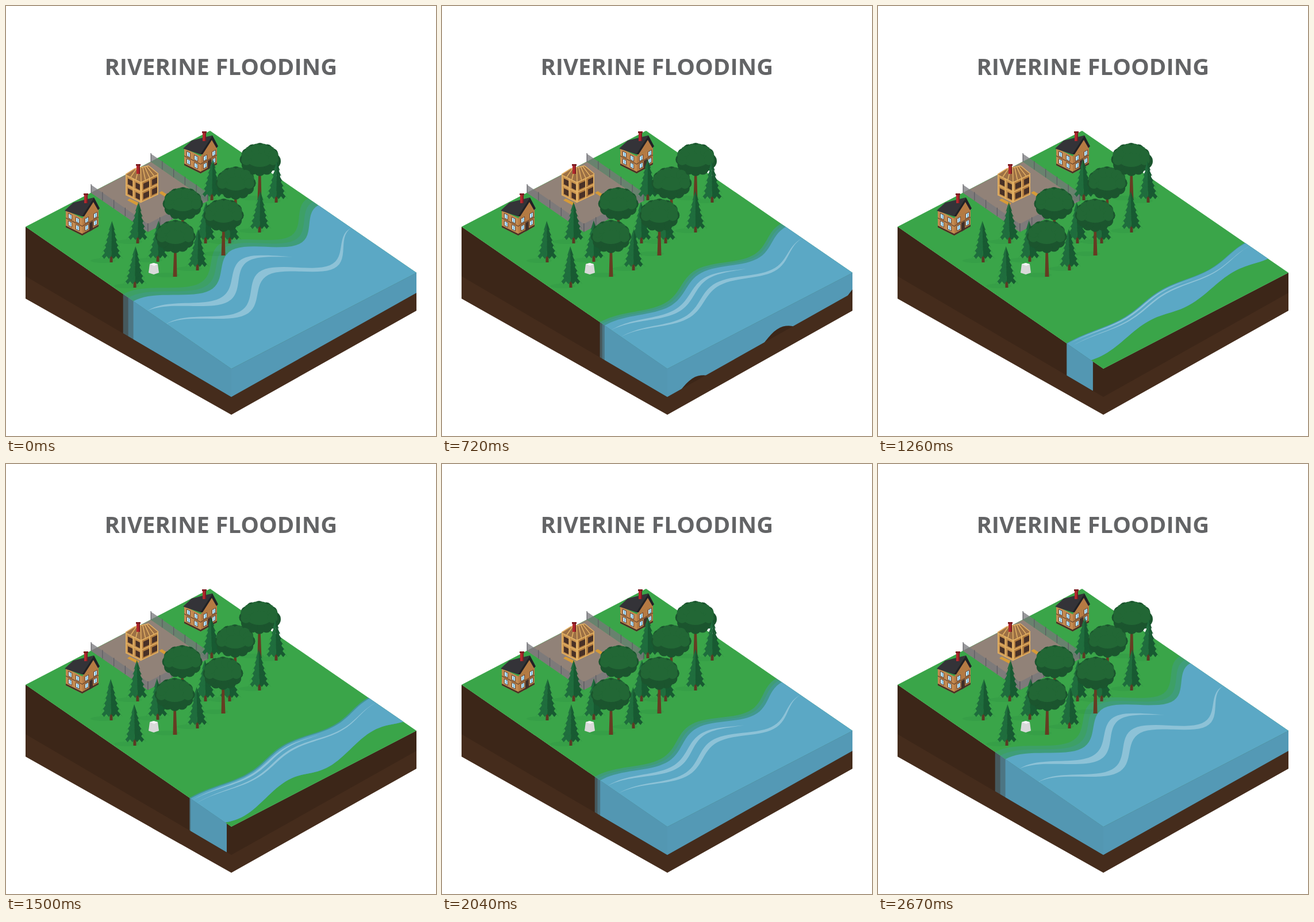
These frames come from a looping animation (748 by 748 pixels, 2700 ms). An HTML page:

```html
<!DOCTYPE html>
<html lang="en">
<head>
<meta charset="utf-8">
<title>Riverine flooding</title>
<style>
html, body { margin: 0; width: 100%; height: 100%; overflow: hidden; background: #fff; }
svg { display: block; width: 748px; height: 748px; }
text { font: bold 40px "Open Sans", sans-serif; fill: #636466; }
</style>
</head>
<body>
<svg viewBox="0 0 748 748">
  <defs>
    <clipPath id="topClip"><path d="M355 217 714 464 392 631 34 384Z"/></clipPath>
    <clipPath id="riverClip"><path id="river"/></clipPath>
  </defs>

  <text x="171.400" y="120">RIVERINE FLOODING</text>

  <path fill="#452c1c" d="M34 384 392 631 714 464V530L392 711 34 509Z"/>
  <path fill="#3c2618" d="M34 384 392 631 714 464V499L392 680 34 470Z"/>
  <path fill="#3aa549" d="M355 217 714 464 392 631 34 384Z"/>

  <g clip-path="url(#topClip)"><g clip-path="url(#riverClip)">
    <path id="top0" fill="#4496a8"/>
    <path id="top1" fill="#4496a8"/>
    <path id="top2" fill="#5ba8c5"/>
    <path id="waveA" fill="#fff" fill-opacity=".3"/>
    <path id="waveB" fill="#fff" fill-opacity=".3"/>
  </g></g>
  <path clip-path="url(#riverClip)" fill="#5499b5" d="M392 631 714 464V499L392 680Z"/>
  <path id="side0" fill="#5397b2" fill-opacity=".45"/>
  <path id="side1" fill="#5397b2" fill-opacity=".45"/>
  <path id="side2" fill="#5397b2"/>

  <g id="buildings"></g>
  <g id="trees"></g>
  <path fill="#d9d9d9" d="M250 449 257 447 264 449 266 464 257 467 248 464Z"/>
  <path fill="#f4f4f4" d="M250 449 257 447 264 449 258 452Z"/>
</svg>
<script>
const $ = id => document.getElementById(id);
const LOOP = 2700, TURN = 1335, STEP = 30, TAU = 2 * Math.PI;

const lerp = (a, b, k) => a + (b - a) * k;
const range = n => [...Array(n).keys()];

// Ground plane: a runs down the left edge, b along the back edge.
const ground = (a, b) => [34 + 358 * a + 322 * b, 384 + 247 * a - 167 * b];
const curve = (fn, from, to, n = 60) => range(n + 1).map(i => fn(lerp(from, to, i / n)));
const poly = pts => 'M' + pts.join('L') + 'Z';

// Every shore and ripple is the same wavy line, shifted along a.
const flow = (low, shift) => b => ground(
  lerp(.582, .803, low) + shift + lerp(0, .03, low) * (.5 - b)
    - lerp(.058, .016, low) * Math.cos(2 * TAU * b ** 1.1), b);

// The far bank, measured as depth below the front edge.
const farBank = low => {
  const s = (1 - low) / .128;
  return b => {
    const depth = 26 * s - 25 - 20 * (b - .5) + (9 + 4 * s) * Math.cos(TAU * (b - .07 - .1 * s) / .46);
    const [x, y] = ground(1, b);
    return [x, y + depth];
  };
};

const ripple = (low, shift, end) => {
  const half = b => lerp(.016, .004, low) * Math.sin(Math.PI * b / end);
  return poly([
    ...curve(b => flow(low, shift - half(b))(b), 0, end),
    ...curve(b => flow(low, shift + half(b))(b), end, 0)
  ]);
};

function drawWater(t) {
  const low = Math.max(0, 1 - Math.abs(t - TURN) / TURN) * TURN / 1170;
  const far = curve(farBank(low), -.5, 1.4, 120);
  $('river').setAttribute('d', poly([...far, [900, 0], [0, 0]]));

  // The bank meets the left face where it rises above the top edge.
  const topY = x => 384 + (x - 34) * .69, bottomY = x => 680 + (x - 392) * .588;
  const hit = far.find(([x, y]) => y < topY(x));
  const right = Math.min(392, hit[0]);

  const gap = lerp(.05, .006, low);
  [-gap, -gap / 2, 0].forEach((shift, i) => {
    const shore = curve(flow(low, shift), 0, 1), left = shore[0][0];
    const top = $('top' + i);
    top.setAttribute('d', poly([...shore, [800, 464], [800, 800], [left, 800]]));
    if (i < 2) top.setAttribute('fill-opacity', lerp(.3, .65, low));
    $('side' + i).setAttribute('d', poly([
      [left, topY(left)], [right, topY(right)], [right, bottomY(right)], [left, bottomY(left)]
    ]));
  });
  $('waveA').setAttribute('d', ripple(low, lerp(.068, .01, low), .69));
  $('waveB').setAttribute('d', ripple(low, lerp(.16, .03, low), 1));
}

const rect = (x, y, w, h, fill) => `<rect x="${x}" y="${y}" width="${w}" height="${h}" fill="${fill}"/>`;
const path = (d, fill, more = '') => `<path d="${d}" fill="${fill}" ${more}/>`;
const wall = (x, y, slope, inner) => `<g transform="matrix(1 ${slope} 0 1 ${x} ${y})">${inner}</g>`;
const pane = (x, y) => rect(x, y, 7, 9, '#5d4538') + rect(x + 1, y + 1, 5, 7, '#d9f0fa') + rect(x + 3, y + 1, 1.5, 7, '#58a9d2');
const panes = (...columns) => columns.map(x => pane(x, 3) + pane(x, 16)).join('');
const chimney = (x, y) => rect(x, y, 6, 15, '#b3282d') + rect(x + 4, y, 2, 15, '#7d1d22') + rect(x - 1, y - 2, 8, 3, '#7d1d22');

function house(dx, dy) {
  const trim = w => rect(0, 13, w, 1.5, '#6d4930') + rect(0, 27, w, 3, '#4a3226');
  return `<g transform="translate(${dx} ${dy})">`
    + path('M133 369 152 336 161 354Z', '#b57a43')
    + wall(104, 355, .5, rect(0, 0, 29, 30, '#c48a50') + trim(29) + panes(4, 17))
    + wall(133, 369, -.55, rect(0, 0, 28, 30, '#b57a43') + trim(28) + panes(4, 19) + rect(12, 15, 6, 15, '#40302a'))
    + path('M102 356 117 342 153 333 135 362 132 366Z', '#343338')
    + path('M153 333 163 352 160 355 152 341 136 366 132 366Z', '#222126')
    + chimney(136, 328) + '</g>';
}

function fence(p, q) {
  const posts = curve(k => [lerp(p[0], q[0], k), lerp(p[1], q[1], k)], 0, 1, 5);
  return path(poly([p, q, [q[0], q[1] - 14], [p[0], p[1] - 14]]), '#77777b', 'fill-opacity=".75"')
    + posts.map(([x, y]) => rect(x - .5, y - 15, 1.2, 15, '#5c5c62')).join('');
}

function frameHouse() {
  const beam = '#e0ae62', dark = '#493127';
  const storeys = (w, fill) => rect(0, 0, w, 36, fill)
    + range(2).map(i => range(2).map(j => rect(4 + j * w / 2, 5 + i * 17, w / 2 - 5, 10, dark)).join('')).join('')
    + range(3).map(i => rect(0, i * 17, w, 2, beam) + rect(i * (w / 2 - 1), 0, 2, 36, beam)).join('');
  const rafters = range(8).map(i => `M${lerp(224, 248, i / 7)} ${lerp(283, 278, i / 7)}L${
    i < 4 ? [208 + i * 9, 293 + i * 4.5] : [235 + (i - 3) * 7.5, 306 - (i - 3) * 3.5]}`).join('');
  return path('M208 293 224 283 248 278 265 292 235 306Z', '#9c7045')
    + wall(208, 293, .5, storeys(27, '#c5904f')) + wall(235, 306, -.47, storeys(30, '#b07b3f'))
    + path(rafters + 'M224 283 248 278', 'none', `stroke="${beam}" stroke-width="1.600"`)
    + path('M211 338 215 335 232 343 228 347ZM266 325 271 322 282 329 277 332Z', '#d79b37')
    + chimney(227, 277);
}

const [back, left, front, right] = [ground(0, .677), ground(0, .354), ground(.276, .354), ground(.276, .677)];
$('buildings').innerHTML = path(poly([back, left, front, right]), '#918278')
  + fence(left, front) + fence(back, right) + fence(front, right)
  + house(206, -108) + house(0, 0) + frameHouse();

function fir() {
  const tiers = range(6).reverse().map(i => {
    const w = 6 + i * 2.9, y = -57 + i * 9.5, top = y - 15 - i;
    const half = (side, fill) => path(`M0 ${top}` + range(6).map(k =>
      `L${side * w * (1 - k / 5)} ${y + (k % 2 ? -1.5 : 3.5)}`).join('') + 'Z', fill);
    return half(-1, '#1f6d3d') + half(1, '#185a32');
  });
  return rect(-2.5, -12, 5, 12, '#5b3a24') + tiers.join('');
}

function leafy() {
  // Lobes around an ellipse, over the given part of a turn.
  const lobes = (n, from, to, rx, ry, y, r, fill) => `<g fill="${fill}"><ellipse cy="${y}" rx="${rx}" ry="${ry}"/>`
    + range(n).map(i => {
      const angle = TAU * lerp(from, to, i / (n - 1));
      return `<circle cx="${rx * Math.cos(angle)}" cy="${y + ry * Math.sin(angle)}" r="${r}"/>`;
    }).join('') + '</g>';
  return path('M-2-50h4L3.500 0h-7z', '#663c22')
    + lobes(13, 0, 1, 25, 19, -70, 10, '#1b552e')
    + lobes(8, .46, 1.04, 24, 16, -73, 9, '#226735');
}

// kind, x, base y; back to front
const trees = `L,441,337 F,358,338 F,470,342 L,399,378 F,441,394 F,347,413 F,389,413 F,229,413
  L,307,414 L,378,434 F,264,445 F,183,446 F,333,460 L,294,471 F,224,490`.trim().split(/\s+/).map(s => s.split(','));
$('trees').innerHTML =
  '<circle cx="464" cy="270" r="14" fill="#1b552e"/>' +
  trees.map(([, x, y]) => `<ellipse cx="${x - 14}" cy="${y - 3}" rx="22" ry="4" fill="#1d7a38" fill-opacity=".14"/>`).join('') +
  trees.map(([kind]) => `<g class="tree">${kind === 'F' ? fir() : leafy()}</g>`).join('');
const swaying = [...document.querySelectorAll('.tree')];

function drawTrees(t) {
  swaying.forEach((g, i) => {
    const [kind, x, y] = trees[i];
    const sway = Math.cos(TAU * t / LOOP + (i % 3 - 1) * .5);
    g.setAttribute('transform', `translate(${x} ${y}) skewX(${-sway * (kind === 'F' ? 1.2 : .5)})`);
  });
}

function frame() {
  const t = Math.floor(performance.now() % LOOP / STEP) * STEP;
  drawWater(t);
  drawTrees(t);
  requestAnimationFrame(frame);
}
frame();
</script>
</body>
</html>
```
